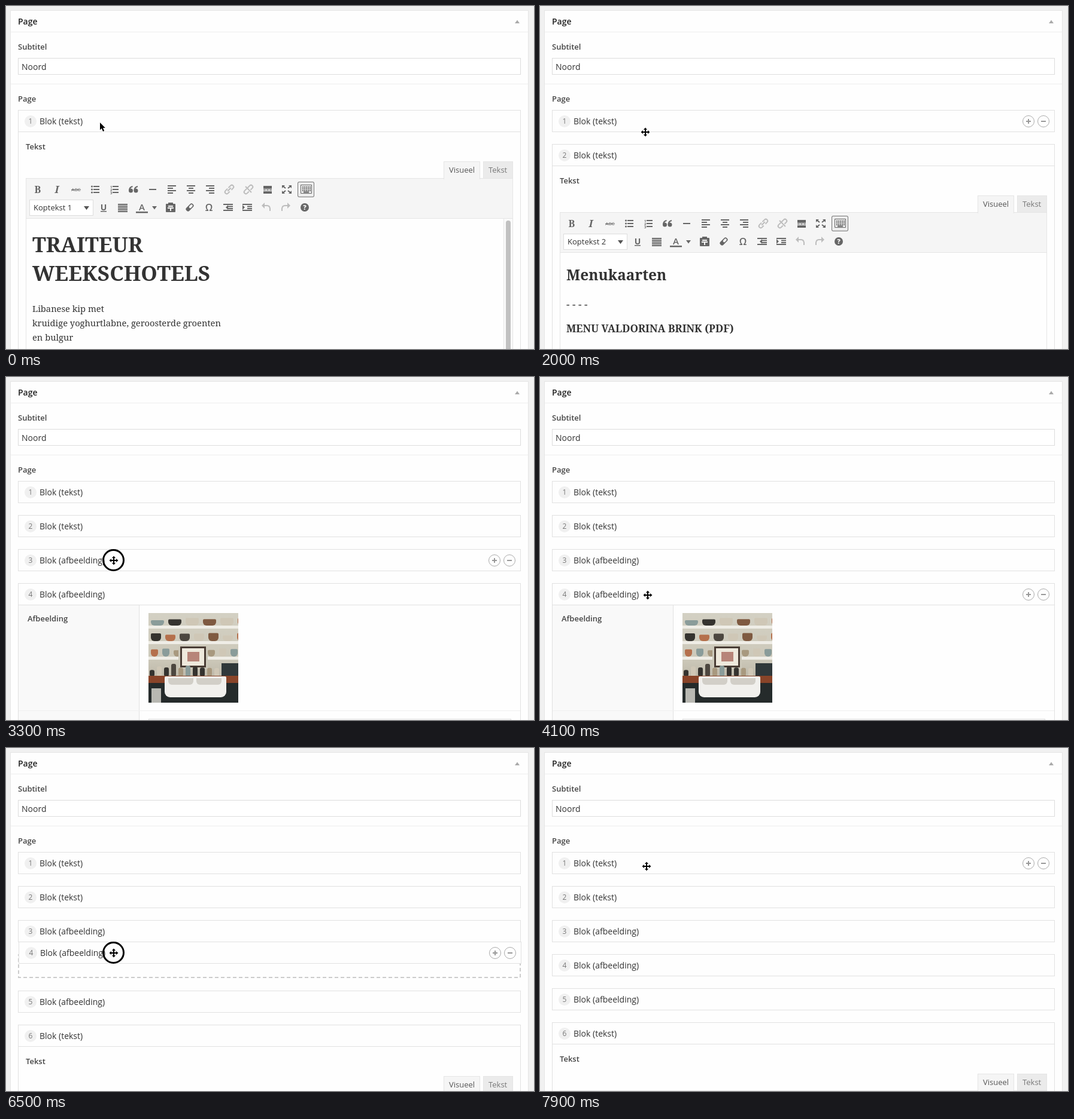
Write an HTML page with a canvas that moves like this. It is 882x574 px and loops after 8 s.

```html
<!DOCTYPE html>
<html lang="nl">
<head>
<meta charset="utf-8">
<title>Page blocks</title>
<style>
html, body { margin: 0; width: 100%; height: 100%; overflow: hidden; background: #f1f1f1; }
canvas { display: block; width: 882px; height: 574px; }
</style>
</head>
<body>
<canvas id="stage" width="882" height="574"></canvas>
<script>
const c = document.getElementById('stage').getContext('2d');
const LOOP = 8000, STEP = 100, PITCH = 57, FIRST = 174;
const PAPER = '#fefefe', BAR = '#f5f5f5', LINE = '#e1e1e1', EDGE = '#e5e5e5';
const INK = '#333', LABEL = '#444', ICON = '#666', FADED = '#bdbdbd';

const blocks = [
  { kind: 'tekst', closeAt: 1500, format: 'Koptekst 1', body: weekMenu },
  { kind: 'tekst', closeAt: 2500, format: 'Koptekst 2', body: menuCards },
  { kind: 'afbeelding', closeAt: 3300, photo: lounge },
  { kind: 'afbeelding', closeAt: 4300, photo: kitchen },
  { kind: 'afbeelding', closeAt: 4900, photo: wood },
  { kind: 'tekst', closeAt: Infinity, format: 'Koptekst 1', body() {} }
];
const drag = { press: 6100, from: 6400, drop: 7200, x: 179, y: 364 };

// pointer moves: leave, arrive, x, y
const moves = [
  [300, 500, 134, 195],
  [800, 1000, 173, 197],
  [1900, 2280, 183, 249],
  [2600, 3000, 180, 307],
  [3500, 4000, 180, 365],
  [4400, 4700, 176, 415],
  [5600, 6000, drag.x, drag.y],
  [6330, 7000, 182, 283],
  [7500, 7900, 178, 198]
];

function pointer(t) {
  let x = 157, y = 195;
  for (const [leave, arrive, tx, ty] of moves) {
    const k = Math.min(1, Math.max(0, (t - leave) / (arrive - leave)));
    x += (tx - x) * k;
    y += (ty - y) * k;
  }
  return { x: Math.round(x), y: Math.round(y) };
}

function sans(size, weight = 400) { return `${weight} ${size}px "Open Sans", sans-serif`; }
function serif(size, weight = 400) { return `${weight} ${size}px "Noto Serif", serif`; }

function text(s, x, y, font = sans(14), color = INK, align = 'left') {
  c.font = font;
  c.fillStyle = color;
  c.textAlign = align;
  c.fillText(s, x, y);
}

function label(s, x, y) { text(s, x, y, sans(13, 600), LABEL); }

function glyph(s, y, font) { text(s, 0, y, font, ICON, 'center'); }

function fill(x, y, w, h, color = ICON) {
  c.fillStyle = color;
  c.fillRect(x, y, w, h);
}

function box(x, y, w, h, bg, edge) {
  fill(x, y, w, h, edge);
  fill(x + 1, y + 1, w - 2, h - 2, bg);
}

function shape(d, color = ICON) {
  c.fillStyle = color;
  c.fill(new Path2D(d));
}

function stroke(d, color = ICON, width = 2) {
  c.strokeStyle = color;
  c.lineWidth = width;
  c.stroke(new Path2D(d));
}

function arrowHead(x, y, size, dir, color = ICON) {
  shape(`M${x} ${y - size}V${y + size}L${x + size * dir} ${y}Z`, color);
}

function caret(x, y, size, dir, color) {
  shape(`M${x - size} ${y}H${x + size}L${x} ${y + size * 1.4 * dir}Z`, color);
}

function disc(x, y, r, color = ICON) {
  c.beginPath();
  c.arc(x, y, r, 0, 7);
  c.fillStyle = color;
  c.fill();
}

function ring(x, y, r, width, color) {
  c.beginPath();
  c.arc(x, y, r, 0, 7);
  c.strokeStyle = color;
  c.lineWidth = width;
  c.stroke();
}

function round(x, y, w, h, r, color = ICON) {
  c.beginPath();
  c.roundRect(x, y, w, h, r);
  c.fillStyle = color;
  c.fill();
}

function at(x, y, draw, turn = 0) {
  c.save();
  c.translate(x, y);
  c.rotate(turn);
  draw();
  c.restore();
}

function shade(...colors) {
  const g = c.createLinearGradient(0, 0, 0, 150);
  colors.forEach((color, i) => g.addColorStop(i / (colors.length - 1), color));
  c.fillStyle = g;
  c.fillRect(0, 0, 150, 150);
}

// four text lines, every second one short; align: 0 left, .5 centre, 1 right
function bars(short, align) {
  for (let i = 0; i < 4; i++) {
    const w = i % 2 ? short : 14;
    fill(Math.round((14 - w) * align) - 7, i * 4 - 7, w, 2);
  }
}

function list(numbered) {
  for (let i = -1; i < 2; i++) {
    fill(-3, i * 5 - 1, 10, 2);
    if (numbered) text(String(i + 2), -7, i * 5 + 2.5, sans(6, 700), ICON);
    else disc(-5.5, i * 5, 1.5);
  }
}

function quote() {
  for (const x of [-4.5, 4]) {
    disc(x, 2, 3.5);
    stroke(`M${x - 2.5} 2Q${x - 2.5}-4 ${x + 3}-5`);
  }
}

function chain(broken) {
  c.rotate(-Math.PI / 4);
  stroke('M-1-3H-6a3 3 0 0 0 0 6H-2M1-3H6a3 3 0 0 1 0 6H2', FADED);
  stroke(broken ? 'M0-7V7' : 'M-4 0H4', FADED);
}

function readMore() {
  fill(-7, -6, 14, 5);
  for (let x = -7; x < 7; x += 5) fill(x, 0, 4, 1.5);
  fill(-7, 3, 14, 4);
}

function expand() {
  for (const x of [-1, 1]) for (const y of [-1, 1]) {
    shape(`M${x * 8} ${y * 7}H${x * 3}L${x * 8} ${y * 2}Z`);
    stroke(`M${x * 7} ${y * 6}L${x * 2} ${y * 2}`);
  }
}

function keyboard() {
  round(-14, -13, 28, 26, 3, '#777');
  round(-13, -12, 26, 24, 2, '#ececec');
  stroke('M-8.5-7.5h18v14h-18Z', ICON, 1);
  for (let y = -5; y < 3; y += 3) for (let x = -6; x < 8; x += 3) fill(x, y, 2, 2);
  fill(-4, 3.5, 9, 2);
}

function paste() {
  round(-8, -6, 16, 14, 1);
  fill(-4, -8, 8, 4);
  fill(-4, -3, 8, 2, BAR);
  fill(-5, 0, 10, 2, BAR);
  fill(-1, 0, 2, 6, BAR);
}

function eraser() {
  at(0, 0, () => {
    round(-7.5, -3.5, 15, 7, 3);
    round(-1, -2, 7, 4, 2, BAR);
  }, -Math.PI / 4);
}

function dent(dir) {
  for (const y of [-6, 4]) fill(-8, y, 16, 2);
  for (const y of [-2.5, 1]) fill(0, y, 8, 2);
  arrowHead(-4 - 4 * dir, 0, 4, dir);
}

function bend(dir) {
  c.scale(dir, 1);
  stroke('M-5-3H1Q7-3 6 6', FADED);
  arrowHead(-3, -3, 5, -1, FADED);
}

const topIcons = [
  () => glyph('B', 6, serif(16, 800)),
  () => glyph('I', 6, 'italic ' + serif(17, 700)),
  () => { glyph('ABC', 3, sans(8)); fill(-8, 0, 16, 1); },
  () => list(false),
  () => list(true),
  quote,
  () => fill(-6, -1, 12, 2),
  () => bars(9, 0),
  () => bars(8, .5),
  () => bars(9, 1),
  () => chain(false),
  () => chain(true),
  readMore,
  expand,
  keyboard
];

const lowIcons = [
  () => { glyph('U', 5, sans(14, 700)); fill(-5, 6, 10, 1.5); },
  () => { for (let y = -6; y < 7; y += 3) fill(-8, y, 16, 2); },
  () => { glyph('A', 5, sans(15, 600)); fill(-10, 7, 20, 2.5); caret(21, -2, 4, 1, ICON); },
  paste,
  eraser,
  () => glyph('Ω', 6, sans(16, 600)),
  () => dent(-1),
  () => dent(1),
  () => bend(1),
  () => bend(-1),
  () => { disc(0, 0, 7); text('?', 0, 4, sans(11, 800), BAR, 'center'); }
];

function weekMenu() {
  ['TRAITEUR', 'WEEKSCHOTELS'].forEach((s, i) => text(s, 44, 238 + i * 48, serif(35, 700)));
  const dish = ['Libanese kip met', 'kruidige yoghurtlabne, geroosterde groenten', 'en bulgur'];
  dish.forEach((s, i) => text(s, 44, 338 + i * 24, serif(14.7)));
  fill(831, 182, 15, 400, '#e7e7e7');
  fill(832, 182, 14, 400, '#fafafa');
  round(835, 185, 8, 400, 4, '#c1c1c1');
}

function menuCards() {
  text('Menukaarten', 44, 228, serif(24.4, 700));
  text('- - - -', 44, 275, serif(17.5));
  text('MENU VALDORINA BRINK (PDF)', 44, 315, serif(17.2, 700));
}

function editor(b) {
  label('Tekst', 33, 66);
  box(797, 86, 50, 29, '#ebebeb', EDGE);
  text('Tekst', 806, 105, sans(13), '#777');
  box(33, 114, 814, 500, PAPER, EDGE);
  fill(34, 115, 812, 66, BAR);
  fill(34, 181, 812, 1, EDGE);
  box(731, 86, 61, 30, BAR, EDGE);
  fill(732, 114, 59, 2, BAR);
  text('Visueel', 740, 105, sans(13), '#555');
  topIcons.forEach((draw, i) => at(53 + i * 32, 133, draw));
  lowIcons.forEach((draw, i) => at(163 + i * 32 + (i > 2 ? 16 : 0), 163, draw));
  box(39, 150, 107, 27, '#fff', '#ddd');
  text(b.format, 46, 168, sans(13));
  caret(134.5, 161, 4.5, 1, '#555');
  b.body();
}

// a slanted piece of furniture with a lighter top
function seat(x, y, w, h, side, top) {
  at(x, y, () => {
    round(-w / 2, -h / 2, w, h, 4, side);
    round(-w / 2 + 4, -h / 2 + 2, w - 8, h * .55, 3, top);
  }, -.6);
}

function lounge() {
  shade('#bfbfb9', '#a3a29b', '#85837c');
  shape('M0 0H150V40L95 24L0 84Z', '#d6d5cc');
  for (let i = 0; i < 2; i++) shape(`M${i * 36} 0h32v${46 - i * 18}l-32 18Z`, '#edf1f2');
  seat(46, 70, 82, 30, '#cfc3ad', '#eadfca');
  seat(82, 90, 44, 25, '#a9794d', '#d3a873');
  seat(84, 40, 24, 22, '#45433d', '#605c52');
  seat(124, 45, 36, 32, '#5b3a29', '#8c5b40');
  seat(140, 92, 40, 26, '#6e3d23', '#9a5a35');
  seat(120, 119, 32, 24, '#242220', '#3a3734');
  seat(26, 138, 50, 34, '#2c2723', '#4b4038');
}

function kitchen() {
  let seed = 7;
  const rnd = () => (seed = seed * 16807 % 2147483647) / 2147483647;
  const wares = ['#4d4740', '#35332f', '#a8997f', '#cfc7b6', '#b5704c', '#7f5a41', '#8a9c9a'];
  shade('#d3d0c3', '#cdc9ba', '#a9a294');
  for (let row = 0; row < 3; row++) {
    const y = 21 + row * 26, gap = 29 - row * 5;
    for (let x = 4; x < 150; x += gap) {
      const h = 9 + rnd() * 5;
      round(x, y - h, gap - 7, h, [2, 2, 6, 6], wares[Math.floor(rnd() * wares.length)]);
    }
    fill(0, y, 150, 5, '#efede6');
  }
  box(50, 53, 49, 40, '#cdc9ba', '#cdc9ba');
  fill(53, 56, 43, 35, '#493c34');
  fill(56, 59, 37, 29, '#eee9dc');
  fill(65, 65, 20, 16, '#b78579');
  for (let x = 2; x < 150; x += 12) {
    const h = 10 + rnd() * 12;
    round(x, 106 - h, 8, h, 3, wares[Math.floor(rnd() * wares.length)]);
  }
  fill(122, 84, 28, 26, '#30383a');
  fill(0, 105, 150, 12, '#894429');
  fill(0, 117, 150, 33, '#252b2b');
  round(27, 106, 103, 35, [2, 2, 9, 9], '#f1f0ed');
  for (const x of [33, 80]) round(x, 109, 42, 11, [0, 0, 6, 6], '#d2cfc8');
  fill(5, 126, 16, 24, '#b8b8b2');
}

function wood() {
  shade('#dfdbd2', '#b8aa98', '#574a40');
}

function imageForm(b) {
  fill(21, 37, 201, 231, '#f9f9f9');
  fill(222, 37, 1, 231, LINE);
  fill(21, 213, 838, 1, '#f0f0f0');
  label('Afbeelding', 36, 64);
  label('Tekst (optioneel)', 36, 241);
  at(238, 50, () => {
    c.beginPath();
    c.rect(0, 0, 150, 150);
    c.clip();
    b.photo();
  });
  box(238, 227, 606, 28, '#fff', '#ddd');
  text('Lindenvoortje Brink Traiteur & Restaurant', 244, 247);
}

function header(n, kind, hover) {
  box(20, 0, 840, 37, PAPER, LINE);
  disc(41, 19, 10, '#f0f0f0');
  text(String(n), 41, 23, sans(12), '#777', 'center');
  text(`Blok (${kind})`, 56, 24);
  if (!hover) return;
  for (const x of [816, 841]) {
    ring(x, 19, 9.5, 1, '#aaa');
    fill(x - 4, 18, 8, 2, '#999');
  }
  fill(815, 15, 2, 8, '#999');
}

function moveCursor(x, y) {
  const arm = 'M-1 0V-4H-3L0-7.5L3-4H1V0Z';
  const arms = paint => { for (let i = 0; i < 4; i++) at(x, y, paint, i * Math.PI / 2); };
  arms(() => stroke(arm, '#fff', 2));
  arms(() => shape(arm, '#000'));
}

function arrowCursor(x, y) {
  const d = 'M0 0V12.5L2.8 9.8L5 15L7.2 14L5 9H8.8Z';
  at(x, y, () => {
    stroke(d, '#fff', 2.5);
    shape(d, '#000');
  });
}

function page() {
  fill(0, 0, 882, 574, '#f1f1f1');
  box(7, 7, 866, 600, PAPER, EDGE);
  for (const y of [43, 130]) fill(8, y, 864, 1, '#eee');
  text('Page', 20, 31, sans(14, 600), '#222');
  caret(854, 29, 4, -1, '#aaa');
  label('Subtitel', 20, 73);
  box(20, 87, 840, 28, '#fff', '#ddd');
  text('Noord', 26, 107);
  label('Page', 20, 160);
}

function slot(y) {
  c.setLineDash([6, 4]);
  stroke(`M21 ${y + 1}h838v38h-838Z`, '#ccc');
  c.setLineDash([]);
}

function draw(t) {
  const p = pointer(t);
  const dragging = t >= drag.from && t < drag.drop;
  const lift = p.y - drag.y;
  const order = [...blocks.keys()];
  // the lifted row trades places once it covers half of the row above
  if (dragging && lift < -PITCH * .7) order.splice(2, 2, 3, 2);
  page();

  let y = FIRST;
  for (const i of order) {
    if (y > 574) break;
    const b = blocks[i], open = t < b.closeAt, isText = b.kind === 'tekst';
    if (dragging && i === 3) {
      slot(y);
      y += PITCH + 4;
      continue;
    }
    const hover = !dragging && t >= 400 && p.y >= y && p.y <= y + 37;
    at(0, y, () => {
      if (open) box(20, 0, 840, isText ? 600 : 269, PAPER, LINE);
      header(i + 1, b.kind, hover);
      if (open) isText ? editor(b) : imageForm(b);
    });
    y += open ? (isText ? 620 : 289) : PITCH;
  }
  if (dragging) {
    at(p.x - drag.x, FIRST + 3 * PITCH + lift, () => header(4, 'afbeelding', true));
  }

  const clicked = blocks.some(b => Math.abs(t - b.closeAt) < STEP || t === b.closeAt - STEP);
  const held = t >= drag.press && t <= drag.drop;
  if (clicked || held) ring(p.x - .5, p.y - .5, 17, 3, '#000');
  (t < 400 ? arrowCursor : moveCursor)(p.x, p.y);
}

const start = performance.now();
function tick(now) {
  const t = Math.max(0, now - start) % LOOP;
  draw(Math.floor(t / STEP) * STEP);
  requestAnimationFrame(tick);
}
draw(0);
requestAnimationFrame(tick);
</script>
</body>
</html>
```
